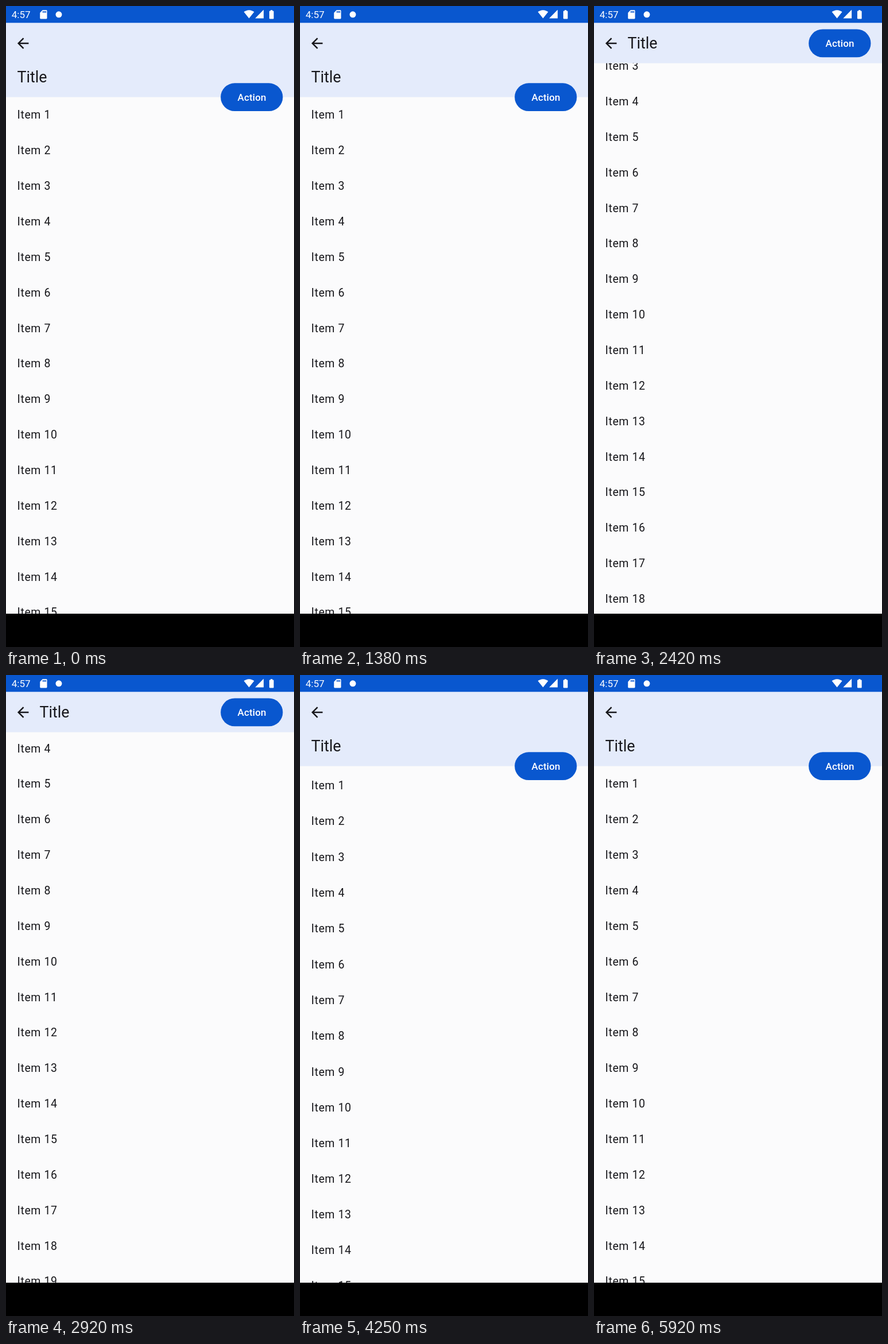
An HTML page with a canvas for the animation above (5.96 s loop, 502 px wide and 1116 px high).

```html
<!DOCTYPE html>
<html lang="en">
<head>
<meta charset="utf-8">
<title>Collapsing header</title>
<style>
  html, body { margin: 0; width: 100%; height: 100%; overflow: hidden; background: #000; }
  canvas { display: block; }
</style>
</head>
<body>
<canvas id="stage" width="502" height="1116"></canvas>
<script>
const ctx = document.getElementById('stage').getContext('2d');
const W = 502, LOOP = 5960, ROW = 61.86, COLLAPSE = 59;
const BLUE = '#0957cf', INK = '#17171b';

// Scroll position: time (ms), offset (px), speed (px/ms)
const SCROLL = [
  [0, 0, 0], [1560, 0, 0], [2000, 80.4, 0.3], [2700, 247.4, 0],
  [2920, 247.4, 0], [3590, 74, -0.3], [3900, 0, 0], [LOOP, 0, 0]
];

// Material icon paths on a 24-unit grid
const ICONS = {
  back: 'M20 11H7.83l5.59-5.59L12 4l-8 8 8 8 1.41-1.41L7.83 13H20v-2z',
  card: 'M18 2h-8L4.02 8 4 20c0 1.1.9 2 2 2h12c1.1 0 2-.9 2-2V4c0-1.1-.9-2-2-2zm-6 6h-2V4h2v4zm3 0h-2V4h2v4zm3 0h-2V4h2v4z',
  wifi: 'M12 21.5L23.64 7c-.45-.34-4.93-4-11.64-4C5.28 3 .81 6.66.36 7L12 21.5z',
  signal: 'M2 22h20V2z',
  battery: 'M15.67 4H14V2h-4v2H8.33C7.6 4 7 4.6 7 5.33v15.33C7 21.4 7.6 22 8.33 22h7.33c.74 0 1.34-.6 1.34-1.33V5.33C17 4.6 16.4 4 15.67 4z'
};
for (const name in ICONS) ICONS[name] = new Path2D(ICONS[name]);

function scrollAt(t) {
  const i = SCROLL.findIndex(k => k[0] > t);
  const [t0, p0, v0] = SCROLL[i - 1], [t1, p1, v1] = SCROLL[i];
  const d = t1 - t0, u = (t - t0) / d, w = 1 - u;
  return w * w * ((1 + 2 * u) * p0 + u * d * v0) + u * u * ((3 - 2 * u) * p1 - w * d * v1);
}

// Overscroll stretch, 0 to 1
function stretchAt(t) {
  return t > 3900 && t < 4600 ? Math.sin((t - 3900) / 700 * Math.PI) ** 2 : 0;
}

function rect(color, y, bottom) {
  ctx.fillStyle = color;
  ctx.fillRect(0, y, W, bottom - y);
}

function text(str, x, y, size, color, spacing = 0, weight = 400) {
  ctx.font = `${weight} ${size}px Roboto, sans-serif`;
  ctx.letterSpacing = spacing + 'px';
  ctx.fillStyle = color;
  ctx.fillText(str, x, y);
}

function icon(name, cx, cy, scale, color) {
  ctx.save();
  ctx.translate(cx - 12 * scale, cy - 12 * scale);
  ctx.scale(scale, scale);
  ctx.fillStyle = color;
  ctx.fill(ICONS[name]);
  ctx.restore();
}

function pill(x, y, w, h) {
  ctx.fillStyle = BLUE;
  ctx.beginPath();
  ctx.roundRect(x, y, w, h, h / 2);
  ctx.fill();
}

function drawList(offset, stretch) {
  rect('#fbfbfc', 0, 1058);
  for (let i = 0; i < 24; i++) {
    const y = 196.4 + i * ROW - offset;
    const mid = y - 7;
    const pull = stretch * mid * (0.0128 - 5.1e-6 * mid);
    text('Item ' + (i + 1), 19.5, y + pull, 19.52, INK, 0.61);
  }
}

function drawHeader(p) {
  rect('#e4ebfb', 29, 158.6 - COLLAPSE * p);
  icon('back', 29.7, 65, 1.22, INK);
  text('Title', 19.5 + 39 * p, 132.5 - 58.3 * p, 26.84, INK);
  const y = 158.7 - 93.8 * p;
  pill(374.2, y - 24.4, 108.3, 48.8);
  text('Action', 403.4, y + 6.1, 17.09, '#fff', 0.12, 500);
}

function drawStatusBar() {
  rect(BLUE, 0, 29.3);
  text('4:57', 9.7, 21.3, 17.09, '#fff');
  icon('card', 65.4, 14.8, 0.77, '#fff');
  ctx.beginPath();
  ctx.arc(92, 14.8, 5.5, 0, 2 * Math.PI);
  ctx.fill();
  icon('wifi', 423.6, 14.2, 0.77, '#fff');
  icon('signal', 441.7, 14, 0.74, '#fff');
  icon('battery', 462.8, 14.7, 0.77, '#fff');
}

function frame(now) {
  const t = now % LOOP;
  const offset = scrollAt(t);
  drawList(offset, stretchAt(t));
  drawHeader(Math.min(1, offset / COLLAPSE));
  drawStatusBar();
  rect('#000', 1058, 1116);
  requestAnimationFrame(frame);
}
requestAnimationFrame(frame);
</script>
</body>
</html>
```
